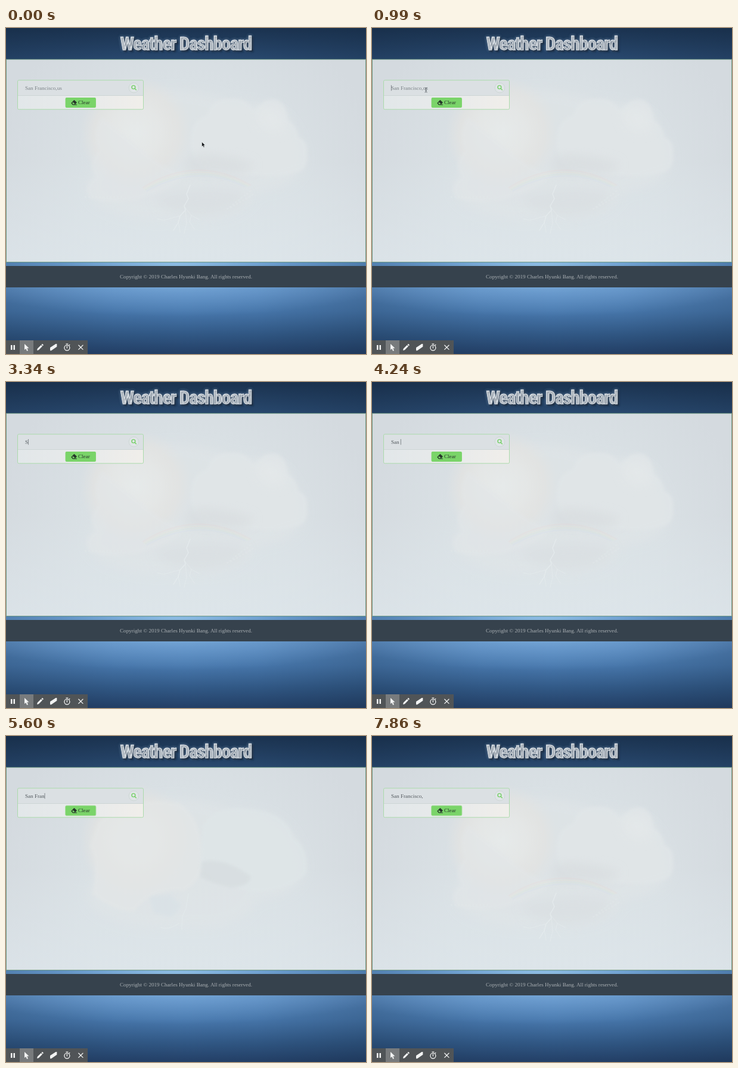
Recreate the animation shown at these times as an HTML page. Size 604 by 548 pixels, loop 8000 ms.

```html
<!DOCTYPE html>
<html lang="en">
<head>
<meta charset="utf-8">
<title>Weather Dashboard</title>
<style>
  html, body { margin: 0; width: 100%; height: 100%; overflow: hidden; background: #1b3150; }
  svg { display: block; width: 100%; height: 100%; }
  text { font: 9.12px "Liberation Serif", "Times New Roman", serif; white-space: pre; }
  #title {
    font-family: Impact, Anton, "Roboto Condensed", Roboto, "Liberation Sans", sans-serif;
    font-weight: 900; font-stretch: 75%; fill: #e6eaed; stroke: #e6eaed; stroke-width: .9;
    text-shadow: 0 0 5px #a9c3dd80, 2px 2px 3px #0b1626;
  }
  .line { fill: none; stroke-linecap: round; stroke-linejoin: round; }
</style>
</head>
<body>
<svg viewBox="0 0 604 548" preserveAspectRatio="none">
  <defs>
    <linearGradient id="sky" x2="0" y2="1">
      <stop offset="0" stop-color="#1b3350"/>
      <stop offset=".095" stop-color="#29496f"/>
      <stop offset=".7" stop-color="#5388bf"/>
      <stop offset=".8" stop-color="#5a8cc3"/>
      <stop offset=".87" stop-color="#4878ad"/>
      <stop offset=".94" stop-color="#315885"/>
      <stop offset="1" stop-color="#233f66"/>
    </linearGradient>
    <linearGradient id="edges">
      <stop offset="0" stop-color="#10233a" stop-opacity=".22"/>
      <stop offset=".3" stop-color="#10233a" stop-opacity=".04"/>
      <stop offset=".5" stop-color="#10233a" stop-opacity="0"/>
      <stop offset=".7" stop-color="#10233a" stop-opacity=".04"/>
      <stop offset="1" stop-color="#10233a" stop-opacity=".22"/>
    </linearGradient>
    <radialGradient id="horizon" gradientUnits="userSpaceOnUse" cx="0" cy="0" r="1"
      gradientTransform="translate(285 405) scale(400 80)">
      <stop offset="0" stop-color="#a5d2f0" stop-opacity=".8"/>
      <stop offset=".5" stop-color="#86b6e2" stop-opacity=".38"/>
      <stop offset="1" stop-color="#7eaedd" stop-opacity="0"/>
    </radialGradient>
    <radialGradient id="pane" gradientUnits="userSpaceOnUse" cx="302" cy="270" r="330">
      <stop offset="0" stop-color="#dbe2e5"/>
      <stop offset=".55" stop-color="#d9e0e4"/>
      <stop offset="1" stop-color="#d4dadf"/>
    </radialGradient>
    <linearGradient id="paneLow" x2="0" y2="1">
      <stop offset=".5" stop-color="#dfe8ed" stop-opacity="0"/>
      <stop offset="1" stop-color="#dfe8ed" stop-opacity=".6"/>
    </linearGradient>
    <radialGradient id="sun">
      <stop offset="0" stop-color="#e6eaea"/>
      <stop offset=".45" stop-color="#e5e7e6" stop-opacity=".9"/>
      <stop offset=".75" stop-color="#e4e3e0" stop-opacity=".6"/>
      <stop offset="1" stop-color="#e2e3e2" stop-opacity="0"/>
    </radialGradient>
    <linearGradient id="cardRow">
      <stop offset="0" stop-color="#e2e7e9"/>
      <stop offset=".6" stop-color="#e9ebeb"/>
      <stop offset="1" stop-color="#f0eeea"/>
    </linearGradient>
    <filter id="soft" x="-20%" y="-20%" width="140%" height="140%"><feGaussianBlur stdDeviation="2.5"/></filter>
    <filter id="softer" x="-40%" y="-40%" width="180%" height="180%"><feGaussianBlur stdDeviation="9"/></filter>
    <clipPath id="paneClip"><rect y="53" width="604" height="340"/></clipPath>
  </defs>

  <rect width="604" height="548" fill="url(#sky)"/>
  <rect width="604" height="548" fill="url(#edges)"/>
  <rect y="380" width="604" height="110" fill="url(#horizon)"/>
  <text id="title" x="191.5" y="37">Weather Dashboard</text>

  <g clip-path="url(#paneClip)">
    <rect y="52" width="604" height="342" fill="url(#pane)"/>
    <rect y="52" width="604" height="342" fill="url(#paneLow)"/>
    <path filter="url(#softer)" fill="#e0e5e7" opacity=".65"
      d="M165 130Q130 190 150 235Q120 275 160 300Q220 330 290 320Q400 330 420 275Q500 270 500 215Q480 120 380 125Q270 80 165 130Z"/>
    <circle cx="218" cy="175" r="95" fill="url(#sun)"/>
    <g id="clear">
      <path filter="url(#soft)" fill="#e1e6e8" opacity=".75"
        d="M312 172Q318 150 337 147Q343 118 377 119Q404 117 417 139Q438 112 458 123Q474 134 471 154Q490 165 490 184Q507 188 505 211Q508 239 485 243Q460 252 420 248Q360 250 322 230Q304 200 312 172Z"/>
      <path filter="url(#softer)" fill="#e5e9ea" opacity=".6" d="M420 140Q450 118 468 145Q480 170 450 175Q420 172 420 140Z"/>
      <path filter="url(#soft)" fill="#e2e6e8" opacity=".5"
        d="M160 150Q143 180 155 205Q135 230 150 250Q125 268 143 287Q190 300 240 282Q290 268 300 245Q260 235 230 205Z"/>
      <path filter="url(#softer)" fill="#d6dadd" opacity=".6" d="M310 215Q350 208 415 228Q410 250 345 243Q310 250 300 232Z"/>
      <path filter="url(#softer)" fill="#d7dcdf" opacity=".5" d="M250 285Q330 262 405 280Q390 312 330 315Q260 310 250 285Z"/>
      <g id="rainbow" class="line" stroke-width="2.5" opacity=".14"></g>
      <g class="line" stroke="#e6ecee" opacity=".8">
        <path stroke-width="1.4" d="M309 264L303 279L306 287L299 299L301 306L292 316L289 327L281 340"/>
        <path stroke-width=".8" d="M299 300L311 315L308 326L316 338M292 316L276 320L266 323L254 321M301 306L303 328L299 345M289 325L292 343M311 315L324 322"/>
      </g>
      <path class="line" stroke="#e2e8ea" stroke-width="2.5" stroke-dasharray="1 5" opacity=".5"
        d="M371 304L410 274M377 302L414 280M133 284H194M445 243L500 226"/>
    </g>
    <g id="hazy">
      <path filter="url(#soft)" fill="#e4e7e7" opacity=".6"
        d="M155 145Q200 100 290 112Q325 135 328 185Q340 235 300 260Q245 255 215 295Q180 295 145 265Q155 205 140 185Z"/>
      <path filter="url(#soft)" fill="#dfe6e8" opacity=".7"
        d="M330 150Q350 118 400 122Q470 125 482 170Q510 190 504 232Q470 263 415 262Q360 255 325 220Z"/>
      <path filter="url(#soft)" fill="#d5dbde" opacity=".65" d="M328 211Q365 203 410 235Q412 252 378 255Q345 247 326 237Z"/>
      <path filter="url(#soft)" fill="#d7e1e6" opacity=".55" d="M241 270L275 267L294 284L280 304L248 298Z"/>
      <path class="line" stroke="#e3eaec" stroke-width="1.5" opacity=".7" d="M306 265L302 290L296 303L295 325M290 315Q275 326 260 322"/>
    </g>
  </g>
  <rect x=".5" y="52.8" width="603" height="340.7" fill="none" stroke="#6d9883"/>

  <rect y="400" width="604" height="36" fill="#36424d"/>
  <text x="191" y="421.3" fill="#aab0b4">Copyright © 2019 Charles Hyunki Bang. All rights reserved.</text>

  <rect x="19.5" y="88" width="211" height="49" rx="2" fill="url(#cardRow)"/>
  <rect x="19.5" y="88" width="211" height="25.5" rx="2" fill="#dbe0e3"/>
  <path d="M20 113.5H230" stroke="#cdd5d5"/>
  <rect x="19.5" y="87.8" width="211" height="49" rx="2" fill="none" stroke="#abdaab"/>
  <circle cx="214.4" cy="100.5" r="8.3" fill="#e0e5e7" stroke="#c9d3d1" stroke-width=".8"/>
  <g class="line" stroke="#74d066" stroke-width="1.4">
    <circle cx="213.9" cy="99.5" r="2.9"/><path d="M216.1 101.8L218.3 104"/>
  </g>
  <rect x="99.6" y="117" width="51.3" height="16.9" rx="2" fill="#7ad469"/>
  <rect id="halo" x="99.6" y="117" width="51.3" height="16.9" rx="2" fill="none" stroke="#a9dfa0" stroke-width=".9"/>
  <path d="M109.2 126.2L113.7 121.4Q114.3 120.8 115 121.4L118.5 124.7Q119 125.4 118.4 126L115.9 128.4H119V129.4H112Z" fill="#26382a"/>
  <path d="M111 126.2L112.5 124.7L115.4 127.5L114.6 128.3H112.8Z" fill="#7ad469"/>
  <text x="121" y="128.3" fill="#26342a">Clear</text>

  <text id="query" x="32" y="104"></text>
  <path id="caret" d="M0 96V105.5" stroke="#6c7276" stroke-width=".8"/>
  <circle id="click" cx="91" cy="105" r="19" fill="none" stroke="#d9796c" stroke-width="1.6" opacity=".65"/>
  <path id="arrow" d="M0 0V8L1.8 6.4L3.2 9.2L4.6 8.5L3.3 5.8H5.8Z" fill="#15181b" stroke="#eef1f2" stroke-width=".6"/>
  <path id="beam" class="line" d="M88.8 100.3Q90.6 100.3 90.6 101.5Q90.6 100.3 92.4 100.3M90.6 101.5V107M88.8 108Q90.6 108 90.6 107Q90.6 108 92.4 108M89.6 105H91.6" stroke="#4a5156" stroke-width=".7"/>

  <rect y="525" width="137" height="23" fill="#505457"/>
  <rect x="23" y="525" width="23" height="23" fill="#787b7d"/>
  <g fill="#f2f3f3">
    <path d="M8 533H10.5V541H8ZM12.5 533H15V541H12.5Z"/>
    <path d="M31 531V541L33.4 539L35.1 543L37 542.2L35.3 538.3H38.5Z"/>
    <path d="M52 542L52.7 539L58.8 532.9L61 535.1L54.9 541.3ZM59.5 532.2L60.5 531.2Q61.1 530.9 61.7 531.5L62.5 532.3Q63 532.9 62.5 533.5L61.7 534.4Z"/>
    <path d="M74 537.2L83.5 531H85.4V535.8L76 542.3H74Z"/>
  </g>
  <g class="line" stroke="#f2f3f3" stroke-width="1.3">
    <circle cx="102.4" cy="537.6" r="4.5"/>
    <path d="M101 531.2H103.8M102.4 535V538M106 533.3L106.8 532.5M121.8 533.2L129 540.4M129 533.2L121.8 540.4"/>
  </g>
</svg>
<script>
const $ = id => document.getElementById(id);
const show = (id, on) => $(id).setAttribute("visibility", on ? "visible" : "hidden");
const LOOP = 8000, HINT = "San Francisco,us";

// [start, x, y]
const pointer = [[0, 328.5, 191.5], [100, 276, 172], [170, 222, 152], [240, 169.5, 132.5],
  [380, 135, 120], [510, 101.5, 108.5]];
// [start, letters typed, caret visible]
const typing = [[0, 0, 0], [790, 0, 1], [1160, 0, 0], [1360, 0, 1], [2040, 0, 0], [2730, 0, 1],
  [3030, 0, 0], [3340, 1, 1], [4010, 3, 1], [4240, 4, 1], [5000, 5, 1], [5210, 7, 1],
  [5340, 8, 1], [5980, 9, 1], [6210, 11, 1], [6360, 11, 0], [6860, 12, 1], [7210, 13, 1],
  [7360, 14, 1], [7860, 14, 0]];

const at = (steps, t) => steps.filter(s => s[0] <= t).pop();
const between = (t, a, b) => t >= a && t < b;

// Largest headline whose tight spacing still fits the header.
function sizeTitle() {
  const title = $("title"), room = 222, gaps = 16, tight = 1.4;
  title.style.fontSize = "100px";
  const em = title.getComputedTextLength() / 100;
  const size = Math.min(31.5, (room + gaps * tight) / em);
  title.style.fontSize = size + "px";
  title.style.letterSpacing = Math.min(.6, (room - size * em) / gaps) + "px";
}

function drawRainbow() {
  $("rainbow").innerHTML = ["#efd0c8", "#f0e6c4", "#cfe8d2", "#cbdcf0"].map((color, i) =>
    `<path d="M${230 + i * 2} ${268 + i * 2}Q${320} ${212 + i * 5} ${410 - i * 3} ${264 + i}" stroke="${color}"/>`).join("");
}

function draw(t) {
  const [, count, caretOn] = at(typing, t);
  const [, x, y] = at(pointer, t);
  const query = $("query");
  query.textContent = count ? HINT.slice(0, count) : HINT;
  query.setAttribute("fill", count ? "#545a5f" : "#7b8287");
  const end = count ? query.getComputedTextLength() : 0;
  $("caret").setAttribute("transform", `translate(${32.4 + end} 0)`);
  show("caret", caretOn);
  $("arrow").setAttribute("transform", `translate(${x} ${y})`);
  show("arrow", t < 650);
  show("beam", between(t, 650, 2730));
  show("click", between(t, 790, 990));
  const hazy = between(t, 5000, 7860);
  show("hazy", hazy);
  show("clear", !hazy);
  show("halo", t >= 5000);
}

sizeTitle();
drawRainbow();
const start = performance.now();
function tick() {
  draw((performance.now() - start) % LOOP);
  requestAnimationFrame(tick);
}
tick();
</script>
</body>
</html>
```
